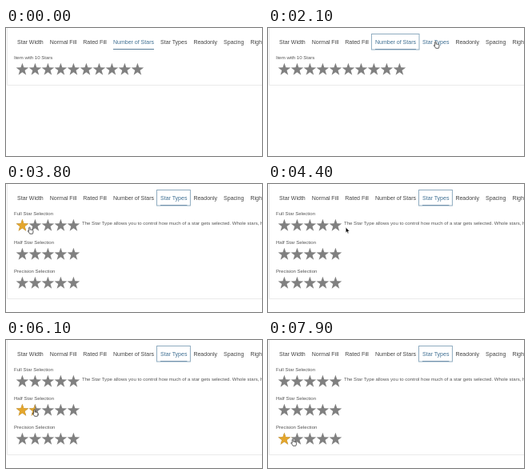
Animation of 320 by 160 pixels, one loop 8000 ms. Source, as an HTML page:

```html
<!DOCTYPE html>
<html lang="en">
<head>
<meta charset="utf-8">
<title>Star rating tabs</title>
<style>
  html, body { margin: 0; width: 100%; height: 100%; overflow: hidden; background: #fff; }
  svg { display: block; width: 100vw; height: 100vh; }
  text { font: 6.05px "Liberation Sans", Arial, sans-serif; fill: #555; }
  .tab { font-size: 7.03px; fill: #444; }
  .tab.on { fill: #3f6f92; }
  #frame { fill: none; stroke: #eaeaea; }
  .star { fill: #808080; }
  .gold .star { fill: #e4a62c; }
  #ring { fill: none; stroke: #8eabc0; }
  #line { fill: #587c98; }
</style>
</head>
<body>
<svg viewBox="0 0 320 160">
  <defs>
    <polygon id="star"/>
    <clipPath id="fill"><rect id="fillBox" height="160"/></clipPath>
  </defs>
  <path id="frame"/>
  <g id="tabs"></g>
  <rect id="line" y="26" height="1"/>
  <rect id="ring" y="7.5" height="19.5"/>
  <g id="ten"></g>
  <g id="types">
    <text x="95" y="51">The Star Type allows you to control how much of a star gets selected. Whole stars, half stars</text>
  </g>
  <g class="gold" clip-path="url(#fill)"><g id="gold"></g></g>
  <g id="cursor">
    <path id="arrow" d="M.3 .3V6.7L1.8 5.4 2.8 7.7 3.8 7.2 2.8 5H4.8Z" fill="#000" stroke="#fff" stroke-width=".4"/>
    <path id="hand" transform="translate(-1.2 -.4) scale(1.08 1)"
      d="M1.7 5.6V1.2Q1.7 .4 2.4 .4T3.1 1.2V3.5Q4 3 4.4 3.7 5.2 3.3 5.6 4 6.6 3.8 6.6 4.8V6.3Q6.6 7.5 6 8.7H2.7Q2.3 7.6 .6 5.6 .2 4.8 .9 4.8Z"
      fill="#fff" stroke="#222" stroke-width=".7" stroke-linejoin="round"/>
  </g>
</svg>
<script>
const LOOP = 8000, STEP = 100;
const LEFT = 12.4, PITCH = 16, TOP = 44, ROW = 36;
const $ = id => document.getElementById(id);

function set(el, attrs) {
  for (const key in attrs) el.setAttribute(key, attrs[key]);
}
function add(parent, tag, attrs, text = '') {
  const el = document.createElementNS('http://www.w3.org/2000/svg', tag);
  set(el, attrs);
  el.textContent = text;
  return parent.appendChild(el);
}
function show(id, on) {
  $(id).style.display = on ? '' : 'none';
}
function addStars(parent, row, count) {
  for (let i = 0; i < count; i++)
    add(parent, 'use', { href: '#star', class: 'star', x: LEFT + 8 + i * PITCH, y: TOP + 8 + row * ROW });
}
function addItem(parent, row, count, label) {
  add(parent, 'text', { x: 10, y: TOP - 5 + row * ROW }, label);
  addStars(parent, row, count);
}

const points = Array.from({ length: 10 }, (_, i) => {
  const r = i % 2 ? 3.3 : 8.2, a = i * Math.PI / 5;
  return [r * Math.sin(a), -r * Math.cos(a)].map(v => v.toFixed(2)).join();
});
set($('star'), { points: points.join(' ') });

// Tabs follow each other with a fixed gap
let nextX = 14;
const tabs = ['Star Width', 'Normal Fill', 'Rated Fill', 'Number of Stars', 'Star Types',
  'Readonly', 'Spacing', 'Right to Left'].map(name => {
  const el = add($('tabs'), 'text', { x: nextX, y: 20, class: 'tab' }, name);
  const tab = { el, x: nextX, width: el.getComputedTextLength() };
  nextX += tab.width + 8;
  return tab;
});

addItem($('ten'), 0, 10, 'Item with 10 Stars');
['Full Star', 'Half Star', 'Precision'].forEach((kind, row) => addItem($('types'), row, 5, kind + ' Selection'));
addStars($('gold'), 0, 5);

// Pointer moves: end time, duration, end point; it rests in between
const moves = [
  [400, 0, 154, 125], [500, 100, 154, 111], [800, 200, 188, 40], [1100, 200, 207, 18],
  [1600, 100, 212, 18], [2100, 100, 208, 17],
  [3500, 700, 14, 60], [3800, 300, 28, 54], [4400, 600, 97, 54], [4600, 100, 102, 54],
  [5100, 400, 7.5, 70], [5600, 500, 17, 87], [6100, 500, 34, 87],
  [7000, 600, 7, 104], [7300, 300, 17, 124], [7900, 600, 29.5, 124]
];

function pointer(t) {
  let x = 0, y = 0;
  for (const [end, span, toX, toY] of moves) {
    if (t < end - span) break;
    const k = span ? Math.min(1, (t - end + span) / span) : 1;
    x += (toX - x) * k;
    y += (toY - y) * k;
  }
  return [x, y];
}

// Whole, half and exact rating under the pointer
const snap = [n => Math.ceil(n), n => Math.ceil(n * 2) / 2, n => n];

function draw(t) {
  const [x, y] = pointer(t);
  const switched = t >= 2200;
  const row = Math.floor((y - TOP) / ROW);
  const rating = (x - LEFT) / PITCH;
  const onStars = switched && row >= 0 && (y - TOP) % ROW < 15 && rating > 0 && rating < 5;
  const onTab = t >= 1600 && y < 22 && x > tabs[4].x;
  const active = tabs[switched ? 4 : 3];

  show('cursor', t >= 400);
  set($('cursor'), { transform: `translate(${x} ${y})` });
  show('hand', onStars || onTab);
  show('arrow', !onStars && !onTab);

  for (const tab of tabs)
    tab.el.classList.toggle('on', tab === active || (onTab && tab === tabs[4]));
  set($('line'), { x: active.x, width: active.width });
  set($('ring'), { x: active.x - 4.5, width: active.width + 8.5 });
  show('ring', t >= 1600);

  set($('frame'), { d: `M1.5 0V${switched ? 143.5 : 71.5}H320` });
  show('ten', !switched);
  show('types', switched);
  $('types').style.opacity = Math.min(1, (t - 2100) / 500);

  show('gold', onStars);
  if (onStars) {
    set($('gold'), { transform: `translate(0 ${row * ROW})` });
    set($('fillBox'), { width: LEFT + PITCH * snap[row](rating) });
  }
}

const start = performance.now();
function tick() {
  const t = (performance.now() - start) % LOOP;
  draw(Math.floor(t / STEP) * STEP);
  requestAnimationFrame(tick);
}
tick();
</script>
</body>
</html>
```
